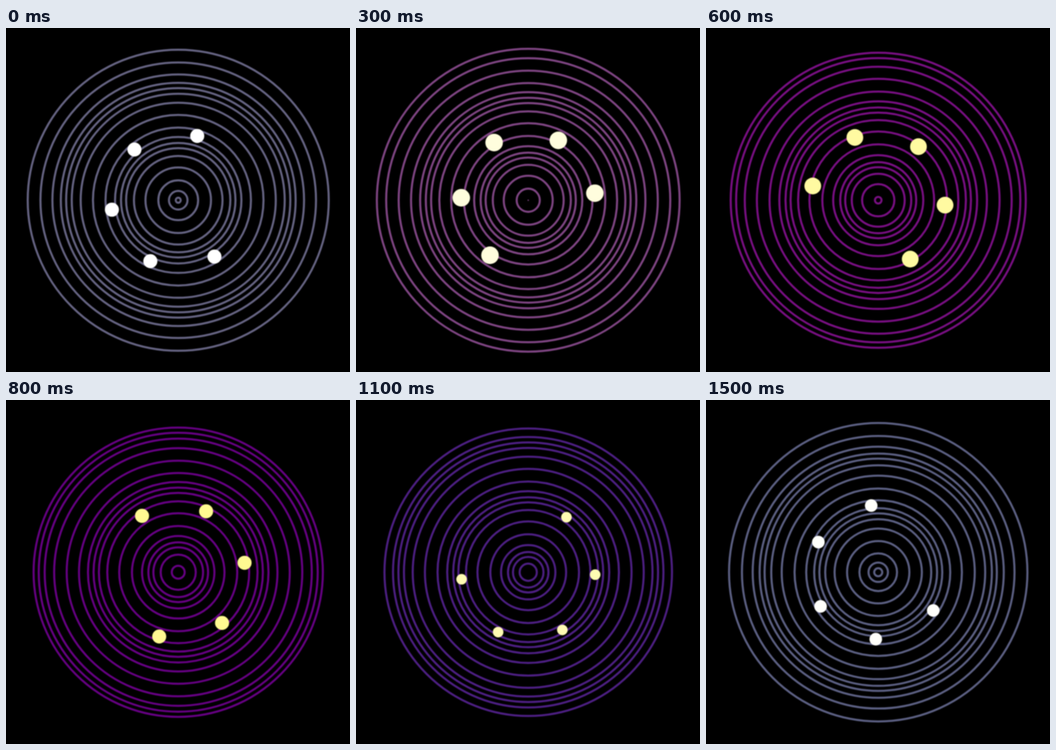
An HTML page with a canvas for the animation above (1.6 s loop, 748 by 748 pixels).

```html
<!DOCTYPE html>
<html lang="en">
<head>
<meta charset="utf-8">
<title>Rippling rings</title>
<style>
  html, body { margin: 0; width: 100%; height: 100%; overflow: hidden; background: #000; }
  canvas { display: block; width: 748px; height: 748px; filter: blur(.8px); }
</style>
</head>
<body>
<canvas id="stage" width="748" height="748"></canvas>
<script>
const ctx = document.getElementById('stage').getContext('2d');
const LOOP = 1600, STEP = 100;
const CENTER = 374.5;
const RINGS = 17, GAP = 19.448, SWING = 9, LINE = 4.5;
const DOTS = 5, ORBIT = 145.7;

const rgb = (...c) => `rgb(${c.map(Math.round).join(',')})`;

function circle(x, y, r) {
  ctx.beginPath();
  ctx.arc(x, y, r, 0, 2 * Math.PI);
}

function draw(time) {
  // The picture advances in held steps.
  const step = Math.floor(time / STEP + 0.02);
  const a = 2 * Math.PI * step * STEP / LOOP;
  const sin = Math.sin(a), cos = Math.cos(a);

  ctx.fillStyle = '#000';
  ctx.fillRect(0, 0, 748, 748);

  // Evenly spaced rings, displaced by a travelling wave.
  ctx.strokeStyle = rgb(102 + 27 * sin, 50 + 50 * cos, 131);
  for (let i = 0; i < RINGS; i++) {
    const k = i + 0.5;
    const r = Math.abs(GAP * k - SWING * Math.sin(k + a));
    ctx.lineWidth = Math.min(LINE, 2 * r);
    circle(CENTER, CENTER, r);
    ctx.stroke();
  }

  // Dots sit one radian apart on the orbit.
  ctx.fillStyle = rgb(255, 252 + 3 * cos, 200 + 55 * cos);
  for (let k = 1; k <= DOTS; k++) {
    circle(CENTER + ORBIT * Math.cos(k + a), CENTER + ORBIT * Math.sin(k + a), 15.3 + 4.1 * sin);
    ctx.fill();
  }
}

const start = performance.now();
function tick() {
  draw((performance.now() - start) % LOOP);
  requestAnimationFrame(tick);
}
tick();
</script>
</body>
</html>
```
